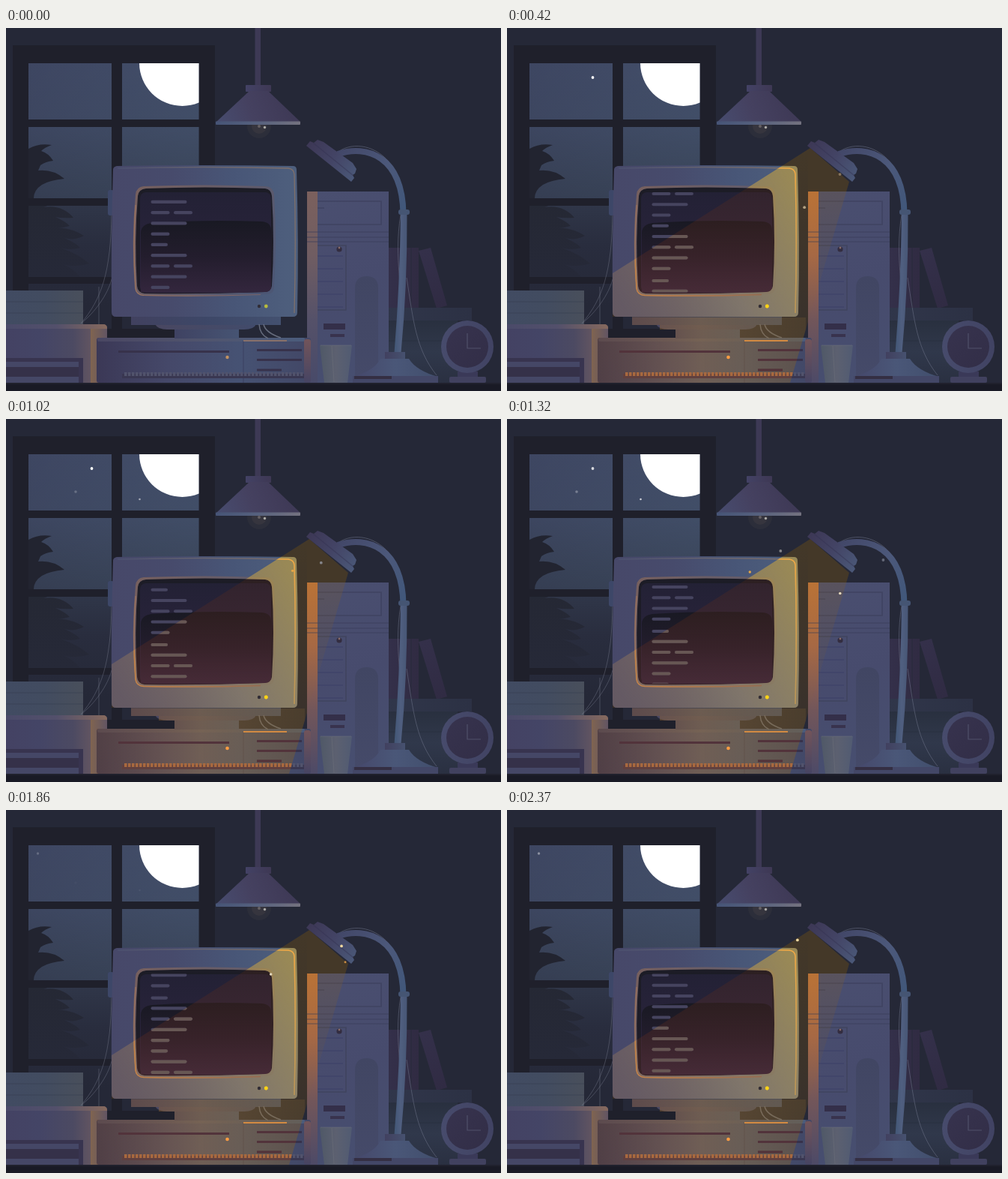
Write an HTML page with a canvas that moves like this. It is 661x484 px and loops after 2400 ms.

```html
<!DOCTYPE html>
<html lang="en">
<head>
<meta charset="utf-8">
<title>Night desk</title>
<style>
html, body { margin: 0; width: 100%; height: 100%; overflow: hidden; background: #252837; }
canvas { display: block; }
</style>
</head>
<body>
<canvas id="stage" width="661" height="484"></canvas>
<script>
const ctx = document.getElementById('stage').getContext('2d');
const LOOP = 2400;
const TAU = Math.PI * 2;

function grad(x0, y0, x1, y1, ...colors) {
  const g = ctx.createLinearGradient(x0, y0, x1, y1);
  colors.forEach((c, i) => g.addColorStop(i / (colors.length - 1), c));
  return g;
}
// Rectangles are given by their edges.
function box(x0, y0, x1, y1, fill, r = 0) {
  ctx.fillStyle = fill;
  ctx.beginPath();
  ctx.roundRect(x0, y0, x1 - x0, y1 - y0, r);
  ctx.fill();
}
function dot(x, y, r, fill) {
  ctx.fillStyle = fill;
  ctx.beginPath();
  ctx.arc(x, y, r, 0, TAU);
  ctx.fill();
}
function shape(d, fill) {
  ctx.fillStyle = fill;
  ctx.fill(new Path2D(d));
}
function line(d, stroke, width = 1) {
  ctx.strokeStyle = stroke;
  ctx.lineWidth = width;
  ctx.stroke(new Path2D(d));
}
function clipped(d, draw, rule = 'nonzero') {
  ctx.save();
  ctx.clip(new Path2D(d), rule);
  draw();
  ctx.restore();
}

const STAGE = 'M0 0H661V484H0Z';
const BODY = 'M148 184Q265 182 383 184Q388 184 388 189Q391 285 389 379Q389 385 383 385H147Q141 385 141 379Q140 280 143 189Q143 185 148 184Z';
const BEZEL = 'M184 211Q265 208 347 211Q357 212 358 222Q362 285 358 347Q357 355 348 355Q265 358 183 357Q173 356 172 347Q167 285 173 222Q174 212 184 211Z';
const GLASS = 'M187 214Q265 211 346 214Q354 215 355 224Q359 285 355 344Q354 351 346 352Q265 355 185 354Q176 353 175 344Q171 285 176 224Q177 215 187 214Z';
const BEAM = 'M405 160L141 327V385H167V396H204V402H225V413H121V473H378L457 205Z';
const RIM = 'M173 236Q169 290 173 347Q174 356 184 356.5Q265 358 340 355.5';
const CASE_SLOTS = 'M150 431.5H298M335 429.5H395M335 442.5H395M335 456H368';

function drawWindow(t) {
  box(9, 23, 279, 473, '#1f202b');
  let panes = '';
  for (const [y, h] of [[47, 75], [132, 95], [237, 95], [341, 60]]) {
    panes += `M30 ${y}h111v${h}h-111zM155 ${y}h102.5v${h}h-102.5z`;
  }
  clipped(panes, () => {
    box(30, 47, 258, 401, grad(0, 47, 0, 370, '#414b67', '#3e4862', '#333b4e', '#292d3e', '#252837'));
    box(30, 47, 258, 235, grad(30, 60, 230, 190, 'rgba(56,62,88,.35)', 'rgba(72,91,115,.3)'));
    dot(235.5, 46.5, 57.5, '#fff');
    shape('M30 236L62 230Q58 237 50 239Q75 235 90 253Q75 254 66 252Q80 258 85 264Q72 268 62 266Q88 266 104 277Q91 284 78 280Q94 287 99 293Q86 297 73 293Q98 302 111 314Q94 320 76 315Q92 322 99 332H30Z', grad(0, 230, 0, 332, '#252834', '#262938'));
    shape('M30 161Q44 153 61 156Q52 159 47 164Q57 167 63 177Q53 178 46 183L43 190Q63 188 78 201Q58 203 48 209Q37 216 37 227H30Z', '#222430');
    drawStars(t);
  });
}

function drawPendant() {
  box(332.5, 0, 340, 77, '#3d3955');
  box(320, 76, 354, 85, grad(320, 0, 354, 0, '#434265', '#3e3854'), 1);
  dot(338, 131, 16, 'rgba(55,55,62,.4)');
  dot(338, 131, 10, 'rgba(70,66,69,.4)');
  dot(338, 131, 2, '#656064');
  dot(345.5, 132.5, 1.7, '#aaa9a6');
  shape('M325 84H350L393 125H281Z', grad(281, 125, 370, 90, '#474c6f', '#454160', '#3f3a57'));
  box(280, 124.5, 393, 129, grad(280, 0, 393, 0, '#465476', '#56617e', '#74727f'), 1);
}

function drawShelf() {
  box(511, 293, 551, 373, grad(511, 0, 551, 0, '#34304a', '#302b42'));
  line('M541 293V373', '#292a3a');
  shape('M551 297L567 293L589 370L575 374Z', grad(552, 300, 588, 370, '#34304a', '#302b43'));
  box(511, 373, 622, 390, grad(511, 0, 622, 0, '#30364a', '#2c3144'));
  box(511, 390, 603, 473, grad(0, 390, 0, 473, '#29303f', '#30384b', '#2a3041'));
  line('M511 417H603', '#293040');
}

function drawTower(lit) {
  box(402, 218, 511, 473, grad(402, 218, 511, 473, '#4a4f70', '#474b6d', '#474f70'));
  box(402, 218, 416, 473, lit
    ? grad(0, 218, 0, 473, '#c2763f', '#a8694a', '#72565a', '#4d4a67')
    : grad(0, 218, 0, 473, '#7b605d', '#705d62', '#555169', '#484a69'));
  line('M416 231H501V262H416M416 240H425', '#3f4362', 1.6);
  line('M402 272H511M402 279H511M402 285H511', 'rgba(58,61,90,.5)', 1.5);
  line('M416 290H454V376H416', '#40445f', 1.6);
  for (let y = 304; y < 376; y += 17) line(`M416 ${y}H450`, '#41456a', 2);
  dot(445, 295, 3.6, '#332d40');
  dot(445, 293, 1.4, '#866b68');
  shape('M466 473V347Q466 331 481.5 331Q497 331 497 347V473Z', grad(0, 331, 0, 473, '#414663', '#454a69'));
  box(424, 394, 453, 402, '#342f49');
  box(433, 408, 452, 412, '#38334e');
}

function drawLeftStack() {
  box(0, 350, 103, 395, grad(0, 0, 103, 0, '#414b62', '#424c60', '#494f5b'));
  line('M0 365H103M0 380H103', 'rgba(48,55,75,.45)');
  box(0, 395, 135, 473, grad(0, 0, 135, 0, '#444263', '#444566', '#4c4a62', '#755e60'), [0, 5, 0, 0]);
  box(113, 396, 135, 473, grad(113, 0, 135, 0, '#806450', '#625563'), [0, 4, 0, 0]);
  box(0, 395, 135, 401, grad(0, 0, 135, 0, '#4a4a69', '#53506b', '#86695d'), [0, 5, 0, 0]);
  box(0, 440, 103, 473, '#38344f');
  box(0, 445, 97, 473, '#454766');
  box(0, 452, 97, 465, '#353149');
  line('M141 247C140 325 128 361 100 394M141 335C136 355 119 379 100 394M124 345V395', 'rgba(115,120,139,.45)');
}

function drawKeys(bed, key) {
  box(155, 461, 398, 467, bed);
  for (let x = 158; x < 398; x += 5) box(x, 459, x + 3.5, 464, key);
}

function drawCase() {
  box(121, 413, 407, 473, grad(121, 0, 407, 0, '#3b3856', '#454869', '#465273', '#424766'), 3);
  box(122, 413, 399, 418, grad(122, 0, 399, 0, '#4a4763', '#50546d', '#4b5c7c'), 2);
  box(398, 415, 407, 473, grad(0, 415, 0, 473, '#72545a', '#464463'), 3);
  line('M317 417V473', '#3b4060');
  line('M317 417H375', '#88706a', 2);
  line(CASE_SLOTS, '#37324b', 3);
  dot(295.5, 439, 2.2, '#c29262');
  drawKeys('#393751', '#51536c');
}

function drawMonitor(t, lit) {
  box(136, 216, 144, 250, '#3d4768', 3);
  box(225, 399, 311, 414, grad(225, 0, 311, 0, '#3f4262', '#465473'));
  shape('M199 395H334Q331 402 318 402H215Q203 402 199 395Z', grad(199, 0, 334, 0, '#494761', '#424b6b'));
  box(167, 385, 367, 396, grad(167, 0, 367, 0, '#41415f', '#3d4767', '#43506f'));
  line('M338 395Q339 409 350 414M344 395Q346 406 367 413', '#666c7d', 1.5);
  shape(BODY, grad(141, 0, 389, 0, '#474869', '#474b6c', '#485677', '#4e5f7d'));
  line('M149 187Q265 184 377 187Q384.5 188 385 195Q387.5 286 385 380', grad(149, 0, 385, 0, '#4c5170', '#69656f', '#80706a'), 1.3);
  shape(BEZEL, grad(171, 210, 359, 330, '#77605e', '#655c68', '#4c5674'));
  line(RIM, grad(171, 0, 350, 0, '#a0755e', '#75626a'), 1.2);
  shape(GLASS, grad(0, 213, 0, 355, '#1c1c26', '#1e1b27'));
  clipped(GLASS, () => {
    box(179, 219, 354, 353, grad(0, 219, 0, 353, '#232135', '#28233a', '#30253d'), 8);
    shape('M180 352V272Q181 262 194 260Q265 255 342 258Q354 259 354 270V352Z', grad(0, 258, 0, 352, '#191923', '#231d2d', '#33263d'));
    drawCode(t, '#46445f');
  });
  drawLeds(lit);
}

function drawLeds(lit) {
  dot(338, 371, 2.2, '#302d36');
  dot(347.3, 371, 2.4, lit ? '#ffd415' : '#b7bb3e');
}

// Row widths repeat every five rows; a second bar follows on some rows.
function drawCode(t, color) {
  const rows = [[48], [25, 25], [48], [25], [22.5]];
  clipped('M175 218.5H356V352.5H175Z', () => {
    for (let i = 0; i < 22; i++) {
      const inLoop = i % 10;
      const y = 232 + Math.floor(i / 10) * 144 + inLoop * 14.25 + (inLoop === 9 ? 2 : 0) - t * 144 / LOOP;
      let x = 193.5;
      for (const w of rows[i % 5]) {
        box(x, y - 2.1, x + w, y + 2.1, color, 2.1);
        x += w + 5.5;
      }
    }
  });
}

function drawGlow(t) {
  clipped(BEAM, () => {
    clipped(STAGE + BODY, () => {
      box(121, 150, 402, 473, grad(0, 160, 0, 473, 'rgba(150,100,0,.27)', 'rgba(125,78,0,.2)'));
      box(402, 150, 460, 218, 'rgba(150,100,0,.27)');
      box(402, 218, 460, 473, grad(0, 218, 0, 400, 'rgba(150,100,20,.2)', 'rgba(150,100,20,0)'));
    }, 'evenodd');
    clipped(BODY + GLASS, () => box(141, 180, 391, 386,
      grad(150, 360, 390, 220, 'rgba(170,130,85,.3)', 'rgba(195,155,90,.45)', 'rgba(215,172,55,.55)')), 'evenodd');
    box(121, 386, 399, 473, grad(121, 0, 399, 0, 'rgba(145,85,80,.1)', 'rgba(175,130,80,.32)', 'rgba(150,115,55,.18)'));
    clipped(GLASS, () => {
      box(171, 210, 360, 358, grad(0, 214, 0, 356, 'rgba(110,45,15,.2)', 'rgba(120,55,40,.28)'));
      drawCode(t, '#675754');
    });
    line('M300 187Q340 185.5 377 187Q384.5 188 385 195Q387.5 286 385 380', grad(0, 187, 0, 380, '#efa947', '#b99558'), 1.6);
    line(RIM, grad(171, 0, 350, 0, '#c78346', '#93694f'), 1.4);
    line('M317 417H375', '#d28a42', 2);
    line(CASE_SLOTS, '#52333b', 3);
    drawKeys('#60403f', '#a8693f');
  });
  dot(295.5, 439, 2.2, '#ff9c42');
  drawLeds(true);
}

function drawDeskLamp() {
  line('M441 167C459 152 490 154 511 178M527 249C517 312 532 344 526 402M535 333C544 390 547 428 575 463', 'rgba(114,120,141,.5)');
  line('M443 168C482 155 529 171 530.5 247', grad(443, 165, 533, 245, '#424768', '#4c587a', '#40577a'), 8);
  shape('M527 247H535.5Q536 345 527.5 433H518.5Q526 341 527 247Z', grad(518, 0, 536, 0, '#415675', '#505f80', '#475675'));
  box(524, 242, 539, 249, '#455573', 3);
  shape('M401 157L406 151L411 153L416 149L424 152L463 180L468 188L466 194L463 196L465 200L461 205Z', grad(405, 154, 464, 199, '#3d3856', '#434465', '#4a5777'));
  line('M410 153L464 197', 'rgba(52,49,80,.45)', 1.5);
  box(506, 432, 533, 442, grad(506, 0, 533, 0, '#41405f', '#46516f'));
  shape('M500 441H538Q548 457 577 465H463Q492 457 500 441Z', grad(463, 0, 577, 0, '#45476a', '#4a5778', '#414e6c'));
  box(463, 464, 577, 473, '#434767');
  box(465, 464, 515, 468, '#342f43');
}

function drawClock() {
  box(603, 458, 630, 467, '#3a3958');
  box(592, 465, 641, 473, '#41415f', 2);
  dot(616, 425, 35, grad(581, 0, 651, 0, '#474b6c', '#414363'));
  dot(616, 425, 28, grad(588, 397, 644, 453, '#37334e', '#322e47'));
  line('M616 407V427H634', '#50516a', 1.2);
}

function drawCup() {
  shape('M419 423H462L456 473H425Z', grad(419, 0, 462, 0, '#4f5867', '#5c6070', '#515b72'));
  line('M420 423H461M435 424L438 472', 'rgba(125,127,133,.3)');
}

const STARS = [
  { x: 114.5, y: 66, r: 1.9, from: 190, to: 1510, peak: 1 },
  { x: 93, y: 97, r: 1.8, from: 850, to: 1880, peak: .3 },
  { x: 178.5, y: 107, r: 1.3, from: 850, to: 1880, peak: .75 },
  { x: 42.5, y: 58, r: 1.7, from: 1740, to: 3000, peak: .4 }
];
// Each mote passes through keys of [time, x, y].
const MOTES = [
  { color: '#777572', r: 1.5, keys: [[70, 367, 181], [240, 332.5, 184.5], [330, 314, 188]] },
  { color: '#d9c6a0', r: 1.9, keys: [[60, 466, 252], [240, 431, 247], [470, 388, 237]] },
  { color: '#87745b', r: 1.9, keys: [[270, 474, 203], [690, 392, 181], [800, 371, 176]] },
  { color: '#e5a647', r: 1.7, keys: [[490, 484, 202], [690, 447, 200.5], [1320, 324.5, 204], [1400, 309, 206]] },
  { color: '#85858a', r: 1.9, keys: [[580, 501, 214], [690, 482, 209], [1320, 365.5, 176], [1420, 347, 171]] },
  { color: '#e4d8bd', r: 1.8, keys: [[1120, 484, 239], [1320, 445, 232.5], [1620, 381, 223], [2070, 330, 215.5], [2180, 317, 212]] },
  { color: '#efad4c', r: 2, keys: [[1390, 443, 204], [1620, 401, 197], [1860, 355, 187]] },
  { color: '#f2d9a0', r: 1.9, keys: [[1270, 508, 189], [1320, 502.5, 188], [1620, 470, 182], [2070, 429, 181], [2370, 388, 173.5], [2500, 370, 170]] },
  { color: '#c78b42', r: 1.5, keys: [[1550, 482, 212], [1620, 475, 210], [2070, 434, 196.5], [2170, 423, 193]] }
];
const fade = (t, from, to, span) => Math.max(0, Math.min(1, (t - from) / span, (to - t) / span));

function drawStars(t) {
  for (const s of STARS) {
    ctx.globalAlpha = s.peak * fade(t, s.from, s.to, 240);
    dot(s.x, s.y, s.r, '#fff');
  }
  ctx.globalAlpha = 1;
}

function drawMotes(t) {
  for (const { keys, color, r } of MOTES) {
    const start = keys[0][0], end = keys[keys.length - 1][0];
    if (t < start || t >= end) continue;
    const i = keys.findIndex(k => k[0] > t);
    const a = keys[i - 1], b = keys[i];
    const p = (t - a[0]) / (b[0] - a[0]);
    const x = a[1] + (b[1] - a[1]) * p;
    const y = a[2] + (b[2] - a[2]) * p;
    ctx.globalAlpha = fade(t, start, end, 65);
    dot(x, y, r, x > 460 ? '#777c8b' : color);
  }
  ctx.globalAlpha = 1;
}

function draw(t) {
  const lit = t >= 90 && !(t >= 1200 && t < 1260);
  box(0, 0, 661, 484, '#252837');
  drawWindow(t);
  drawPendant();
  drawShelf();
  drawTower(lit);
  drawLeftStack();
  drawCase();
  drawMonitor(t, lit);
  if (lit) drawGlow(t);
  drawCup();
  drawDeskLamp();
  drawClock();
  box(0, 473, 661, 484, '#191a25');
  line('M0 474H661', '#20212d', 2);
  drawMotes(t);
}

const begin = performance.now();
function frame() {
  draw((performance.now() - begin) % LOOP);
  requestAnimationFrame(frame);
}
frame();
</script>
</body>
</html>
```
